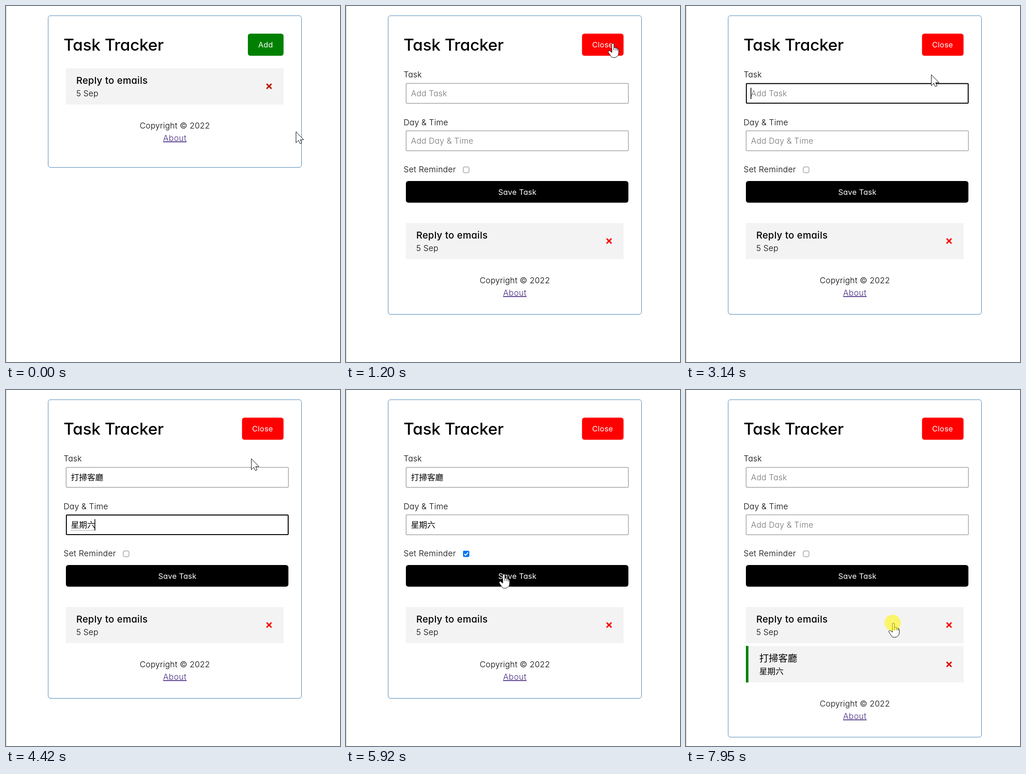
Write an HTML page that moves like this. It is 725 by 773 pixels and loops after 8 s.

```html
<!DOCTYPE html>
<html lang="en">
<head>
<meta charset="utf-8">
<title>Task Tracker</title>
<style>
  html, body { margin: 0; width: 100%; height: 100%; overflow: hidden; background: #fff; }
  svg { display: block; }
  text {
    font: 300 17.6px Inter, "Noto Sans CJK TC", "Noto Sans CJK", sans-serif;
    font-feature-settings: "cv11";
    font-optical-sizing: none;
    letter-spacing: .2px;
  }
  .zh text, text.zh { font-family: "Noto Sans CJK TC", "Noto Sans CJK", sans-serif; letter-spacing: 0; }
  text.title { font-size: 35.2px; font-weight: 500; letter-spacing: -.15px; }
  text.name { font-size: 20.6px; font-weight: 500; }
  text.button { font-size: 16.5px; font-weight: 400; fill: #fff; text-anchor: middle; }
  .hint { fill: #757575; }
  .mid { text-anchor: middle; }
  .line { fill: #fff; stroke: #767676; }
  .focus { fill: none; stroke: #000; stroke-width: 2; }
  .item { fill: #f3f3f3; }
  .cross { fill: none; stroke-width: 3.2; stroke-linecap: round; }
  .caret { stroke: #000; stroke-width: 1.6; }
  .compose { stroke: #333; stroke-dasharray: 1 1.2; }
</style>
</head>
<body>
<svg width="725" height="773" viewBox="0 0 725 773">
  <defs>
    <path id="cross" d="M-4.4-4.4L4.4 4.4M4.4-4.4L-4.4 4.4"/>
  </defs>

  <path d="M.5 0V773" stroke="#c4c4c4"/>
  <rect id="card" x="91.5" y="21" width="550" height="329.5" rx="5.5" fill="none" stroke="#4682b4"/>
  <text class="title" x="125" y="97">Task Tracker</text>

  <g data-on="0-1140">
    <rect x="525" y="60" width="77.5" height="48" rx="5.5" fill="green"/>
    <text class="button" x="563.5" y="90">Add</text>
  </g>
  <g data-on="1140-8000">
    <rect x="512.3" y="60" width="90.2" height="48" rx="5.5" fill="red"/>
    <text class="button" x="557" y="90">Close</text>

    <text x="125" y="155">Task</text>
    <rect class="line" x="130.5" y="168" width="482.5" height="43.3" rx="1"/>
    <text class="hint" x="141" y="196" data-on="0-3470 6390-8000">Add Task</text>
    <text class="zh" x="141" y="195.5" data-on="3470-3540">打掃</text>
    <text class="zh" x="141" y="195.5" data-on="3540-6390">打掃客廳</text>
    <path class="compose" d="M141 201.5H176" data-on="3470-3540"/>
    <path class="compose" d="M141 201.5H211" data-on="3540-3740"/>
    <rect class="focus" x="131" y="168.5" width="481.5" height="42.5" rx="1.5" data-on="2080-4010"/>
    <path class="caret" d="M141 177.5V202" data-on="2080-2610 3140-3470"/>
    <path class="caret" d="M211.5 177.5V202" data-on="3540-3790"/>

    <text x="125" y="259">Day &amp; Time</text>
    <rect class="line" x="130.5" y="271" width="482.5" height="43.3" rx="1"/>
    <text class="hint" x="141" y="299" data-on="0-4420 6390-8000">Add Day &amp; Time</text>
    <text class="zh" x="141" y="298.5" data-on="4420-6390">星期六</text>
    <path class="compose" d="M141 304.5H193" data-on="4420-4550"/>
    <rect class="focus" x="131" y="271.5" width="481.5" height="42.5" rx="1.5" data-on="4010-5400"/>
    <path class="caret" d="M141 280.5V305" data-on="4010-4420"/>
    <path class="caret" d="M193 280.5V305" data-on="4420-5250"/>

    <text x="125" y="361" style="letter-spacing:.35px">Set Reminder</text>
    <rect class="line" x="254.5" y="349.5" width="12.5" height="12.5" rx="2.5"/>
    <g data-on="5480-6390">
      <rect x="254" y="349" width="13.5" height="13.5" rx="2.5" fill="#0075ff"/>
      <path d="M256.8 356L259.7 359L264.8 352.6" fill="none" stroke="#fff" stroke-width="2"/>
    </g>

    <rect x="130" y="380" width="483" height="47" rx="5.5"/>
    <text class="button" x="372" y="409.5">Save Task</text>
  </g>

  <g id="list">
    <rect class="item" x="130" y="135.3" width="472.5" height="78.5"/>
    <text class="name" x="152.5" y="168.5" style="letter-spacing:.35px">Reply to emails</text>
    <text x="152.5" y="196">5 Sep</text>
    <use href="#cross" class="cross" x="571" y="174.3" stroke="#b81800" data-on="0-1140"/>
    <use href="#cross" class="cross" x="571" y="174.3" stroke="red" data-on="1140-8000"/>
  </g>
  <g class="zh" data-on="6390-8000">
    <rect class="item" x="130" y="555.7" width="472.5" height="79.3"/>
    <rect x="130" y="555.7" width="5.5" height="79.3" fill="green"/>
    <text class="name" x="159" y="589.5">打掃客廳</text>
    <text x="159" y="617">星期六</text>
    <use href="#cross" class="cross" x="571" y="595.7" stroke="#d81408"/>
  </g>

  <g id="footer">
    <text class="mid" x="366.5" y="266">Copyright © 2022</text>
    <text class="mid" x="366.5" y="293" fill="#45287f" text-decoration="underline" style="letter-spacing:.5px">About</text>
  </g>

  <g id="cursor">
    <path id="arrow" d="M.5 0V24L6 18.8L9.3 26L13 24.4L9.8 17.3H17Z" fill="#fff" stroke="#000"/>
    <path id="beam" d="M-3.5-10H-1L0-9L1-10H3.5M0-9V9M-3.5 10H-1L0 9L1 10H3.5" fill="none" stroke="#000"/>
    <path id="hand" fill="#fff" stroke="#000" stroke-linejoin="round"
      d="M-2 20V2Q-2 0 .3 0T2.5 2V10Q3 8.5 5 9T7 11Q7 9.8 9 10.2T10.5 12.5Q13 11.5 13 14.5V21Q13 26 9.5 28.5Q7 31 3 31Q-3 31-4 28L-9.5 19.5Q-10.5 17-8 16T-4.5 18ZM2.5 10V15M7 11V15.5M10.4 12.5V16"/>
    <circle cx="-1.5" cy="-.5" r="17.6" fill="rgba(255,247,0,.56)"
      data-on="1070-1200 2080-2150 5400-5480 6320-6460 7950-8000"/>
  </g>
</svg>
<script>
const LOOP = 8000;
const $ = id => document.getElementById(id);

// table: [[time, value], ...] in order, beginning at 0; each value holds until the next
function hold(el, prop, table) {
  const rows = [...table, [LOOP, table[table.length - 1][1]]];
  el.animate(
    rows.map(([time, value]) => ({ offset: time / LOOP, [prop]: value, easing: 'step-end' })),
    { duration: LOOP, iterations: Infinity });
}

document.querySelectorAll('[data-on]').forEach(el => {
  const table = new Map([[0, 0]]);
  for (const range of el.dataset.on.split(' ')) {
    const [from, to] = range.split('-').map(Number);
    table.set(from, 1);
    if (to < LOOP) table.set(to, 0);
  }
  hold(el, 'opacity', [...table]);
});

const shiftY = y => `translate(0px, ${y}px)`;
hold($('card'), 'height', [[0, '329.5px'], [1140, '648.5px'], [6390, '732.8px']]);
hold($('list'), 'transform', [[0, shiftY(0)], [1140, shiftY(336)]]);
hold($('footer'), 'transform', [[0, shiftY(0)], [1140, shiftY(336)], [6390, shiftY(421.3)]]);

// start, end, number of steps, destination
const moves = [
  [450, 740, 5, 579, 81],
  [1330, 1750, 7, 530, 183],
  [2150, 2360, 4, 532, 149],
  [4550, 5180, 10, 282, 351],
  [5250, 5320, 2, 261, 356],
  [5550, 5990, 7, 347, 402],
  [6990, 7550, 9, 450, 506]
];
const ease = p => p * p * (3 - 2 * p);

const trail = [[0, 629, 273]];
let [, x, y] = trail[0];
for (const [start, end, count, toX, toY] of moves) {
  for (let i = 1; i <= count; i++) {
    const p = ease(i / count);
    const time = start + (end - start) * (i - 1) / (count - 1);
    trail.push([time, x + (toX - x) * p, y + (toY - y) * p]);
  }
  [x, y] = [toX, toY];
}

function shapeAt([time, x, y]) {
  const within = (top, bottom) => y >= top && y <= bottom;
  if (x > 512 && x < 603 && within(60, 108)) return 'hand';
  if (time < 1140) return 'arrow';
  if (within(168, 211) || within(271, 314)) return 'beam';
  if (within(380, 427) || within(471, 550)) return 'hand';
  return 'arrow';
}

hold($('cursor'), 'transform', trail.map(([time, x, y]) => [time, `translate(${x}px, ${y}px)`]));
for (const shape of ['arrow', 'beam', 'hand']) {
  hold($(shape), 'opacity', trail.map(row => [row[0], shapeAt(row) === shape ? 1 : 0]));
}
</script>
</body>
</html>
```
